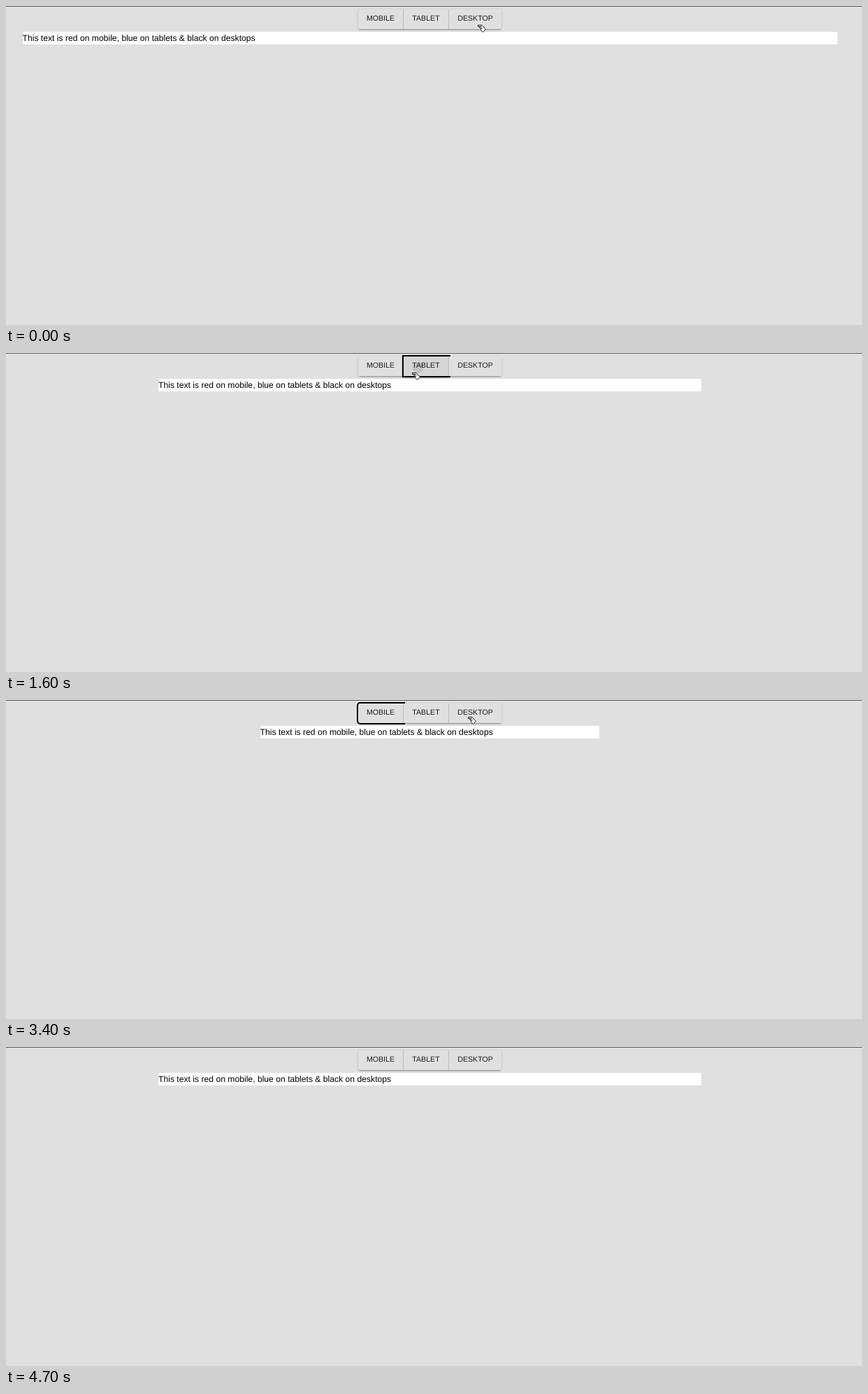
These frames come from a looping animation (1225x457 px, 5000 ms). An HTML page:

```html
<!DOCTYPE html>
<html lang="en">
<head>
<meta charset="utf-8">
<title>Responsive text preview</title>
<style>
  html, body { margin: 0; width: 100%; height: 100%; overflow: hidden; background: #e0e0e0; }
  body { position: relative; font-family: "Liberation Sans", Arial, sans-serif; text-rendering: geometricPrecision; }
  body > *, .button, .ripple, .cursor svg { position: absolute; }
  .anim { animation: 5s step-end infinite; }

  .topline { left: 0; top: 0; width: 100%; height: 1px; background: #5c5c5c; }

  .group {
    left: 504px; top: 5px; width: 205px; height: 27.7px; border-radius: 3px;
    box-shadow: 0 2.3px .8px -1.5px #0003, 0 1.5px 1.5px #00000024, 0 .8px 3.8px #0000001f;
  }
  .button {
    box-sizing: border-box; top: 0; height: 100%; background: #e0e0e0;
    color: rgba(0, 0, 0, .87); font-size: 10.64px; line-height: 27.7px; text-align: center;
    outline: 0 solid #000; outline-offset: -.5px;
    --lift: 0 1.5px 3px -.8px #0003, 0 3px 3.8px #00000024, 0 .8px 5px #0000001f;
  }
  .mobile { left: 0; width: 65px; border-right: 1px solid #bdbdbd; border-radius: 3px 0 0 3px; animation-name: mobile, mobile-ring, mobile-press; }
  .tablet { left: 65px; width: 65px; border-right: 1px solid #bdbdbd; animation-name: tablet, tablet-ring, tablet-press; }
  .desktop { left: 130px; width: 75px; border-radius: 0 3px 3px 0; animation-name: desktop, desktop-ring, desktop-press; }
  .label { position: relative; }
  .clip { position: absolute; inset: 0; overflow: hidden; border-radius: inherit; }
  .ripple { width: 56px; height: 56px; margin: -28px; border-radius: 50%; background: #000; opacity: 0; }
  .mobile .ripple { left: 39px; top: 18px; animation-name: mobile-ripple; }
  .tablet .ripple { left: 21px; top: 16px; animation-name: tablet-ripple; }
  .desktop .ripple { left: 35.5px; top: 14px; animation-name: desktop-ripple; }

  .strip {
    left: 23.5px; top: 37.3px; width: 1166px; height: 18px; background: #fff;
    color: #000; font-size: 12.16px; line-height: 18px; white-space: nowrap; animation-name: resize;
  }

  .cursor { left: 675px; top: 27px; animation-name: move; }
  .cursor svg { left: 0; top: 0; overflow: visible; fill: #fff; stroke: #000; stroke-width: .9; }
  .hand { animation-name: hand; }
  .beam { animation-name: beam; }
  .arrow { animation-name: arrow; }

  @keyframes resize {
    0% { left: 23.5px; width: 1166px; }
    32%, 80% { left: 218px; width: 777px; }
    46% { left: 363.6px; width: 485.7px; }
    100% { left: 218px; width: 777px; }
  }

  /* hover tint */
  @keyframes desktop {
    0%, 18%, 100% { background-color: #e0e0e0; }
    2%, 16% { background-color: #dcdcdc; }
    4% { background-color: #d8d8d8; }
    6% { background-color: #d5d5d5; }
  }
  @keyframes tablet {
    0%, 36%, 68%, 86%, 100% { background-color: #e0e0e0; }
    18%, 66% { background-color: #dcdcdc; }
    20%, 72% { background-color: #d5d5d5; }
  }
  @keyframes mobile {
    0%, 54%, 66%, 88%, 100% { background-color: #e0e0e0; }
    36%, 64%, 86% { background-color: #dcdcdc; }
    38% { background-color: #d5d5d5; }
  }

  /* focus ring */
  @keyframes desktop-ring {
    0%, 30%, 100% { outline-width: 0; }
    12% { outline-width: 2px; }
  }
  @keyframes tablet-ring {
    0%, 40%, 94%, 100% { outline-width: 0; }
    32%, 80% { outline-width: 2px; }
  }
  @keyframes mobile-ring {
    0%, 72%, 100% { outline-width: 0; }
    46% { outline-width: 2px; }
  }

  /* raised while pressed */
  @keyframes desktop-press {
    0%, 14%, 100% { box-shadow: none; }
    4% { box-shadow: var(--lift); }
  }
  @keyframes tablet-press {
    0%, 34%, 82%, 100% { box-shadow: none; }
    30%, 76% { box-shadow: var(--lift); }
  }
  @keyframes mobile-press {
    0%, 50%, 100% { box-shadow: none; }
    40% { box-shadow: var(--lift); }
  }

  @keyframes desktop-ripple {
    0%, 20%, 100% { opacity: 0; transform: scale(.1); }
    12% { opacity: .12; transform: scale(.3); }
    14% { opacity: .12; transform: scale(.75); }
    16% { opacity: .1; transform: scale(.97); }
    18% { opacity: .05; transform: scale(1.05); }
  }
  @keyframes tablet-ripple {
    0%, 40%, 86%, 100% { opacity: 0; transform: scale(.1); }
    32%, 80% { opacity: .09; transform: scale(.28); }
    34%, 82% { opacity: .1; transform: scale(.7); }
    36%, 84% { opacity: .08; transform: scale(1); }
    38% { opacity: .04; transform: scale(1.05); }
  }
  @keyframes mobile-ripple {
    0%, 54%, 100% { opacity: 0; transform: scale(.1); }
    48% { opacity: .09; transform: scale(.4); }
    50% { opacity: .1; transform: scale(.85); }
    52% { opacity: .05; transform: scale(1.05); }
  }

  @keyframes move {
    0% { left: 675px; top: 27px; }
    14% { left: 655px; top: 23px; }
    16% { left: 627px; top: 20px; }
    18% { left: 605px; top: 23px; }
    20% { left: 592px; top: 27px; }
    22% { left: 581px; top: 28px; }
    36% { left: 562px; top: 26px; }
    38% { left: 549px; top: 24px; }
    40% { left: 543px; top: 23px; }
    50% { left: 538px; top: 24px; }
    52% { left: 520px; top: 28px; }
    54% { left: 495px; top: 46px; }
    56% { left: 476px; top: 60px; }
    58% { left: 472px; top: 60px; }
    60% { left: 470px; top: 57px; }
    62% { left: 472.5px; top: 49.5px; }
    64% { left: 530px; top: 26px; }
    66% { left: 600px; top: 22px; }
    68% { left: 661px; top: 24px; }
    72% { left: 622px; top: 24px; }
    74% { left: 602px; top: 24px; }
    76%, 84% { left: 587px; top: 24px; }
    86% { left: 540px; top: 16px; }
    88% { left: 430px; top: 10px; }
    90% { left: 250px; top: 5px; }
    92%, 100% { left: 46px; top: 1px; }
  }
  @keyframes hand {
    0%, 64% { opacity: 1; }
    54%, 88%, 100% { opacity: 0; }
  }
  @keyframes beam {
    0%, 56%, 64%, 100% { opacity: 0; }
    54%, 62% { opacity: 1; }
  }
  @keyframes arrow {
    0%, 62%, 94%, 100% { opacity: 0; }
    56%, 88% { opacity: 1; }
  }
</style>
</head>
<body>
  <div class="topline"></div>

  <div class="group">
    <div class="button mobile anim"><div class="clip"><i class="ripple anim"></i></div><span class="label">MOBILE</span></div>
    <div class="button tablet anim"><div class="clip"><i class="ripple anim"></i></div><span class="label">TABLET</span></div>
    <div class="button desktop anim"><div class="clip"><i class="ripple anim"></i></div><span class="label">DESKTOP</span></div>
  </div>

  <div class="strip anim">This text is red on mobile, blue on tablets &amp; black on desktops</div>

  <div class="cursor anim">
    <svg class="hand anim" width="12" height="12"><path d="M.5 .5H6L11.5 6.5L7.5 10.5L4.5 7.5V5L2.5 4L4 2.5H.5ZM4 2.5H6M4.5 5L6.5 4.5"/></svg>
    <svg class="beam anim" width="1" height="1"><path fill="none" d="M-3 -5H-1L0 -4L1 -5H3M0 -4V4M-3 5H-1L0 4L1 5H3"/></svg>
    <svg class="arrow anim" width="9" height="13"><path d="M.5 .5V10.5L2.8 8.4L4.4 12L6 11.3L4.4 7.8H7.6Z"/></svg>
  </div>
</body>
</html>
```
